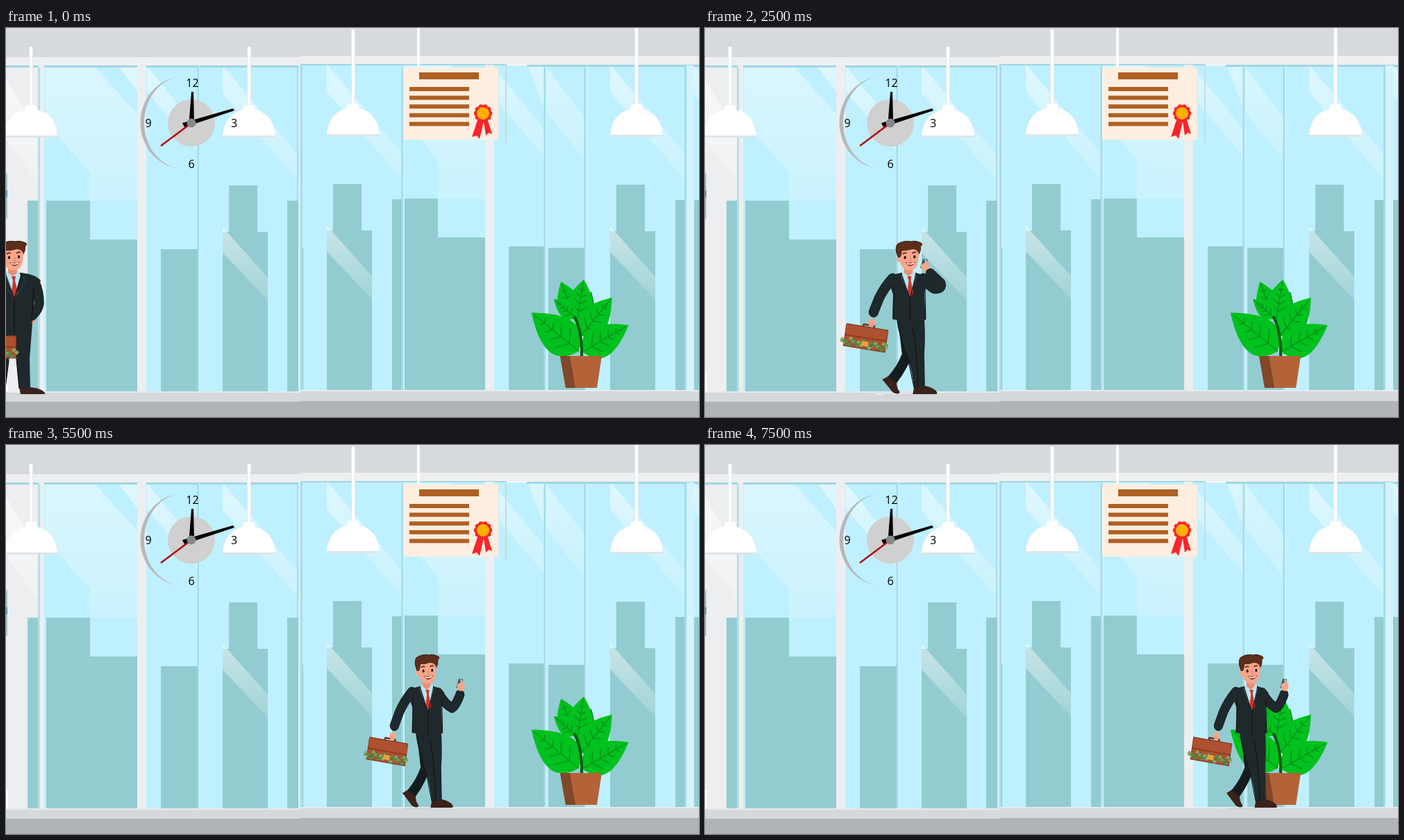
Write an HTML page with a canvas that moves like this. It is 998 px wide and 561 px high and loops after 8 s.

```html
<!DOCTYPE html>
<html lang="en">
<head>
<meta charset="utf-8">
<title>Office walk</title>
<style>
html, body { margin: 0; width: 100%; height: 100%; overflow: hidden; }
canvas { display: block; }
</style>
</head>
<body>
<canvas id="stage" width="998" height="561"></canvas>
<script>
const c = document.getElementById('stage').getContext('2d');
const SUIT = '#1f282b', EDGE = '#0e1315', SKIN = '#f8a58a', WALL = '#edeeef', TOWN = '#92ccd1';

function fill(color, d) { c.fillStyle = color; c.fill(new Path2D(d)); }
function line(color, width, d, cap = 'butt') {
  c.strokeStyle = color; c.lineWidth = width; c.lineCap = cap; c.lineJoin = 'round';
  c.stroke(new Path2D(d));
}
function box(color, x, y, right, bottom) { c.fillStyle = color; c.fillRect(x, y, right - x, bottom - y); }
function dot(color, x, y, rx, ry = rx) {
  c.fillStyle = color; c.beginPath(); c.ellipse(x, y, rx, ry, 0, 0, 7); c.fill();
}
function at(x, y, sx, draw) { c.save(); c.translate(x, y); c.scale(sx, 1); draw(); c.restore(); }

// ---------- room ----------
function shine(y0, y1, a, d) {
  const g = c.createLinearGradient(0, y0, 0, y1);
  g.addColorStop(0, `rgba(255,255,255,${a})`);
  g.addColorStop(1, `rgba(255,255,255,${a * .3})`);
  fill(g, d);
}
function tower(x, y) {
  box(TOWN, x + 9, y, x + 50, y + 70);
  fill(TOWN, `M${x} ${y + 67}H${x + 65}V524H${x}Z`);
  shine(y + 60, y + 165, .5, `M${x} ${y + 60}L${x + 65} ${y + 133}V${y + 166}L${x} ${y + 97}Z`);
  shine(50, 225, .5, `M${x} ${y - 173}L${x + 109} ${y - 43}V${y - 6}L${x} ${y - 133}Z`);
}
function lamp(x, base, top) {
  box('#dfe7eb', x - 3, top, x + 3, base - 42);
  box('#ffffff', x - 2, top, x + 2, base - 42);
  fill('#ffffff', `M${x - 38} ${base}Q${x - 35} ${base - 31} ${x - 9} ${base - 37}L${x - 7} ${base - 44}
    H${x + 7}L${x + 9} ${base - 37}Q${x + 35} ${base - 31} ${x + 38} ${base}Z`);
  box('#dde5e9', x - 37, base, x + 37, base + 3);
}
function room() {
  box('#d6d9dd', 0, 0, 998, 42);
  box('#eeeff0', 0, 42, 424, 54);
  box('#eeeff0', 424, 40, 998, 53);
  box('#bff0ff', 0, 54, 998, 525);
  box(WALL, 0, 57, 47, 525);
  shine(60, 240, .6, 'M0 75L46 150V222L0 160Z');
  box('#a9c7d2', 0, 209, 2, 275);
  box('#5c95ad', 0, 234, 2, 244);
  box('#ffffff', 0, 498, 3, 525);
  for (const [x, y, right] of [[31, 249, 47], [58, 249, 121], [121, 305, 189], [223, 319, 277],
    [405, 249, 421], [424, 317, 428], [556, 247, 572], [572, 246, 622], [622, 302, 690],
    [724, 315, 776], [781, 317, 834], [964, 248, 979], [991, 248, 998]]) box(TOWN, x, y, right, 524);
  tower(312, 227); tower(462, 225); tower(870, 226);
  shine(56, 300, .42, 'M72 56H128L189 124V249H121V208L56 135V56Z');
  shine(54, 290, .42, 'M590 54H640L690 115V246H622V190L572 130V54Z');
  shine(55, 220, .5, 'M162 55H189V92ZM203 55L277 147V180L203 92Z');
  shine(54, 220, .45, 'M703 58L776 147V186L703 100Z');
  shine(54, 220, .4, 'M751 54H776L834 130V192L776 118Z');
  shine(54, 140, .5, 'M991 54L998 63V104L991 95Z');
  // frames
  box('#9fd5e4', 0, 54, 424, 57);
  box('#9fd5e4', 424, 52, 720, 54);
  box('#9fd5e4', 750, 53, 998, 56);
  box(WALL, 47, 54, 55, 525);
  box('#b5dfe9', 46, 57, 49, 525);
  box(WALL, 189, 54, 202, 525);
  box(WALL, 690, 53, 703, 523);
  for (const x of [277, 571, 776, 834]) {
    box('#a3dceb', x - 1.5, 55, x + 1, 523);
    box('#cdf2fb', x + 1, 55, x + 3, 523);
  }
  box('#a3dceb', 419, 57, 421, 249);
  box('#d3eff6', 421, 54, 424, 525);
  box('#a9dbe8', 424, 53, 427, 523);
  box('#a3dceb', 977, 54, 980, 523);
  box('#d4f3fa', 980, 54, 991, 523);
  // floor
  box('#d6d9dc', 0, 525, 424, 540);
  box('#d6d9dc', 424, 523, 998, 538);
  box('#e7eaec', 0, 524, 424, 526);
  box('#e7eaec', 424, 522, 998, 524);
  box('#b1b4b7', 0, 539, 424, 561);
  box('#b1b4b7', 424, 538, 998, 561);
  lamp(36, 155, 27); lamp(350, 155, 27); lamp(500, 153, 2); lamp(908, 154, 0);
  box('#ffffff', 592, 0, 596, 57);
}
function clock() {
  fill('#b5b8ba', 'M256 70A62.500 66.500 0 0 0 256 203A57 66.500 0 0 1 256 70Z');
  dot('#cfd0cf', 267, 137, 34);
  c.fillStyle = '#000';
  c.font = '16px "Open Sans", "Noto Sans", sans-serif';
  c.textAlign = 'center';
  for (const [s, x, y] of [['12', 268.5, 85], ['3', 328.5, 143], ['6', 267, 202], ['9', 205, 143]]) c.fillText(s, x, y);
  fill('#000', 'M263.500 137L267 92H270L271 137ZM254 137L327 116L329 119L257 143Z');
  line('#b00c0c', 2.5, 'M267 137L223 170');
  dot('#85898b', 267, 137, 6.5);
}
function certificate() {
  box('#fdeee0', 572, 57, 709, 161);
  box('#d9e6ea', 709, 57, 710, 161);
  box('#c3dce4', 719, 52, 721, 167);
  box('#ae6023', 595, 64, 681, 74);
  for (let i = 0; i < 5; i++) box('#ae6023', 581, 85 + i * 12.6, 667, 91 + i * 12.6);
  fill('#f8252c', 'M680 130L671 157L678 155L682 160L688 135L691 155L695 151L700 153L693 130Z');
  for (let i = 0; i < 10; i++) dot('#f8252c', 687 + 9.5 * Math.cos(i * .628), 123 + 9.5 * Math.sin(i * .628), 3.7);
  dot('#f8252c', 687, 123, 11);
  dot('#ffb000', 687, 123, 9);
}
// leaf from its base, pointing along an angle in degrees
function leaf(x, y, angle, len, half, color = '#00c11d') {
  c.save();
  c.translate(x, y); c.rotate(angle * Math.PI / 180);
  const a = len * .2, b = len * .62;
  fill(color, `M0 0C${a} ${-half * 1.75} ${b} ${-half} ${len} 0C${b} ${half} ${a} ${half * 1.75} 0 0Z`);
  let d = `M0 0H${len * .94}`;
  for (const k of [.2, .38, .55, .72]) {
    const v = half * (1 - k) * .85;
    d += `M${len * k + v * .7} ${-v}L${len * k} 0L${len * k + v * .7} ${v}`;
  }
  line('#07961b', 1.6, d);
  c.restore();
}
function plant() {
  dot('#f4fbf8', 830, 455, 6, 12);
  leaf(832, 424, -76, 45, 10, '#067a18');
  leaf(820, 420, -111, 58, 17);
  leaf(823, 420, -81, 58, 18);
  leaf(820, 418, -139, 41, 11);
  leaf(828, 444, -51, 71, 20);
  leaf(825, 466, -141, 88, 26);
  leaf(830, 467, -30, 77, 22);
  line('#075d12', 4, 'M819 417Q830 438 829 474', 'round');
  fill('#b46339', 'M798 473H858L851 519H806Z');
  fill('#804728', 'M798 473H812L820 519H806Z');
}

// ---------- man ----------
function head() {
  fill('#e98f75', 'M157 342H170V353L164 358L157 353Z');
  dot(SKIN, 149.5, 333, 3.2, 4.5);
  fill(SKIN, 'M150 318Q148 340 157 347Q165 352 173 347Q180 340 179 318Z');
  fill('#5c2e1c', `M148 331Q143 318 147 312Q155 306 168 308Q173 306 181 309Q187 311 182 315
    Q183 321 179 327Q178 319 169 319Q159 322 154 321Q154 328 151 331Z`);
  line('#30170f', 1, 'M148 329Q143 318 147 312Q155 306 168 308Q173 306 182 310');
  line('#3a1c12', 1.5, 'M155 326Q158 323 161 325M169 325Q172 322 175 324');
  dot('#24130e', 158.5, 331, 1.7, 2.3);
  dot('#24130e', 172.5, 330, 1.7, 2.3);
  line('#df7d67', 1.3, 'M166 331Q169 336 165 336');
  fill('#801f1b', 'M159 338Q167 349 174 337Q167 340 159 338Z');
  line('#ffffff', 1.8, 'M161 339.500Q167 342 172 338.500');
}
function shirt() {
  fill('#b9e6ef', 'M156 350L163 357L172 349L175 357L166 391L153 357Z');
  fill('#c93832', 'M162 358H168L167 364L171 381L166 390L162 381L164 364Z');
}
function limb(d, width = 13) {
  line(EDGE, width + 1.5, d, 'round');
  line(SUIT, width, d, 'round');
}
function briefcase(x, y, angle, w) {
  c.save();
  c.translate(x, y); c.rotate(angle * Math.PI / 180);
  line('#70301a', 2.5, 'M-6 -15V-19H10V-15');
  box('#ad5130', -w, -16, w, 16);
  box('#8e3d22', -w, -1, w, 1);
  line('#7b351e', 1, `M${-w} -16H${w}V16H${-w}Z`);
  // banknotes sticking out of the lid
  for (let i = 0; i < 11; i++) {
    const u = -w - 1 + i * w / 5, v = 8 + 3 * Math.sin(i * 2.3);
    line(i % 2 ? '#5c8a47' : '#87a75d', 5, `M${u - 4} ${v - 2}L${u + 4} ${v + 4}`);
    line('#43683a', 1, `M${u - 4} ${v + 3}L${u + 4} ${v - 1}`);
  }
  box('#e9a43c', -5, 5, 5, 12);
  c.restore();
}
function hand(x, y) {
  dot(SKIN, x, y, 5, 6);
  line('#e28c73', 1, `M${x - 2} ${y}L${x - 1} ${y + 4}M${x + 1} ${y}L${x + 2} ${y + 4}`);
}
function phoneHand(x, y) {
  fill('#4c555b', `M${x - 7} ${y + 4}L${x - 3} ${y - 9}L${x + 4} ${y - 8}L${x} ${y + 5}Z`);
  fill('#cfd5d7', `M${x - 1} ${y - 8}L${x + 3} ${y - 7}L${x + 1} ${y - 3}Z`);
  fill(SKIN, `M${x - 6} ${y}Q${x + 1} ${y - 6} ${x + 5} ${y - 4}Q${x + 8} ${y + 4} ${x + 3} ${y + 9}L${x - 4} ${y + 8}Z`);
}
const arms = {
  down() { hand(217, 424); line(SKIN, 2, 'M217 423L223 426M216 427L220 431'); limb('M183 361Q195 376 202 390L210 410'); },
  call() { phoneHand(188, 342); limb('M185 361Q194 372 202 376Q214 376 211 368L196 354'); },
  raised() { limb('M182 362Q194 380 204 384Q210 382 217 365'); phoneHand(218, 351); }
};
function walk(arm) {
  line('#e9eaeb', 2, 'M115 528H205');
  line('#bfc3c5', 1, 'M128 529H202');
  fill('#3b221b', 'M134 502L125 507Q131 514 140 525Q149 530 151 525Q146 520 146 511Z');
  fill('#151c1f', 'M148 421H174L171 465Q164 490 146 512L133 503Q147 488 154 470Z');
  fill('#3b221b', 'M172 517L188 516Q203 519 206 526L205 528H170Z');
  fill(SUIT, 'M146 419H187Q189 445 187 470L188 518L172 519Q169 495 163 478Q149 445 146 419Z');
  line(EDGE, 1.2, 'M169 430Q176 460 178 518M148 424Q151 447 163 478L172 519');
  briefcase(100.5, 447, 9, 31);
  hand(109, 425);
  arms[arm]();
  limb('M140 361Q128 374 120 390L112 410');
  fill(SUIT, 'M153 353Q138 355 133 363L141 384L140 420Q163 425 189 421L187 382L192 362Q185 355 174 353Z');
  shirt();
  line(EDGE, 1.2, 'M153 354L166 391L175 353M166 391V422M142 372L141 419M188 372L189 420');
  head();
}
function walkFree() {
  fill('#f6fafb', 'M165 486Q160 500 149 512L152 524H171Z');
  walk('down');
}
function stand() {
  line('#cfd4d5', 2, 'M624 521H706');
  fill('#3b221b', 'M635 510L651 512L649 521H630Z');
  fill('#3b221b', 'M671 511H687Q704 513 708 519V521H673Z');
  fill(SUIT, 'M640 418H690L686 470L687 513H671L667 470L664 435L656 472L651 514H634L639 470Z');
  line(EDGE, 1.2, 'M664 422V437M656 472L651 513M667 470L671 513');
  hand(690, 413);
  limb('M694 360Q700 374 700 390Q699 399 690 408', 12);
  briefcase(631.5, 453, 0, 35);
  hand(631, 430);
  fill(SUIT, 'M652 346Q634 348 630 356L634 376L638 419Q664 426 690 418L693 383L702 357Q694 348 674 346Z');
  limb('M635 358Q628 372 628 389L629 414');
  at(498, -7, 1, shirt);
  line(EDGE, 1.3, 'M651 347L664 384L675 346M664 384V422M638 370L637 417M692 369L689 414');
  line('#3c4549', 1, 'M649 352L646 362L651 363L663 384M677 352L681 361L677 363L665 384');
  at(498, -7, 1, head);
}
function standPhone() {
  line('#cdd2d4', 2, 'M516 522H592');
  fill('#3b221b', 'M527 511L543 513L542 522H524Z');
  fill('#3b221b', 'M560 513L576 512Q590 514 593 520V522H560Z');
  fill(SUIT, 'M530 417H578L576 468L577 514H560L558 470L556 433L549 470L543 515H526L531 468Z');
  line(EDGE, 1.2, 'M554 422V434M531 468Q539 474 548 470M558 470Q566 474 576 468M570 422L569 512');
  fill('#f7fbfc', 'M531 373L517 385L533 402Z');
  limb('M531 359Q517 371 508 386Q511 393 527 404', 12);
  limb('M577 359Q586 378 595 388Q600 386 608 364');
  phoneHand(609, 348);
  fill(SUIT, 'M543 347Q530 349 526 357L533 378L532 418Q555 423 579 419L577 381L583 357Q577 349 565 347Z');
  hand(538, 411);
  line(SKIN, 3, 'M530 406L546 412M535 412L542 419', 'round');
  at(390, -6, 1, shirt);
  line(EDGE, 1.2, 'M543 348L556 385L565 347M556 385V420M533 369V417M578 369V417');
  at(390, -6, 1, head);
}

const poses = {
  walk: [1, walkFree],
  call: [.975, () => walk('call')],
  wave: [.9, () => walk('raised')],
  stand: [1, stand],
  phone: [1, standPhone]
};
// one pose every half second: name, x, y
const steps = [
  ['stand', -652, 7], ['walk', -100, 0], ['walk', 0, 0], ['walk', 60, -1],
  ['walk', 78, 0], ['call', 133.5, 0], ['call', 203.5, -1], ['call', 309.5, -2],
  ['call', 335, -3], ['phone', 0, 0], ['stand', -74, 0], ['wave', 458.5, -5],
  ['stand', 0, 0], ['walk', 535, -1], ['walk', 563, -2], ['wave', 638.5, -5]
];
function frame(now) {
  const [name, x, y] = steps[Math.floor(now % 8000 / 500)];
  const [scale, draw] = poses[name];
  room(); clock(); certificate(); plant();
  at(x, y, scale, draw);
  requestAnimationFrame(() => frame(performance.now()));
}
frame(performance.now());
</script>
</body>
</html>
```
